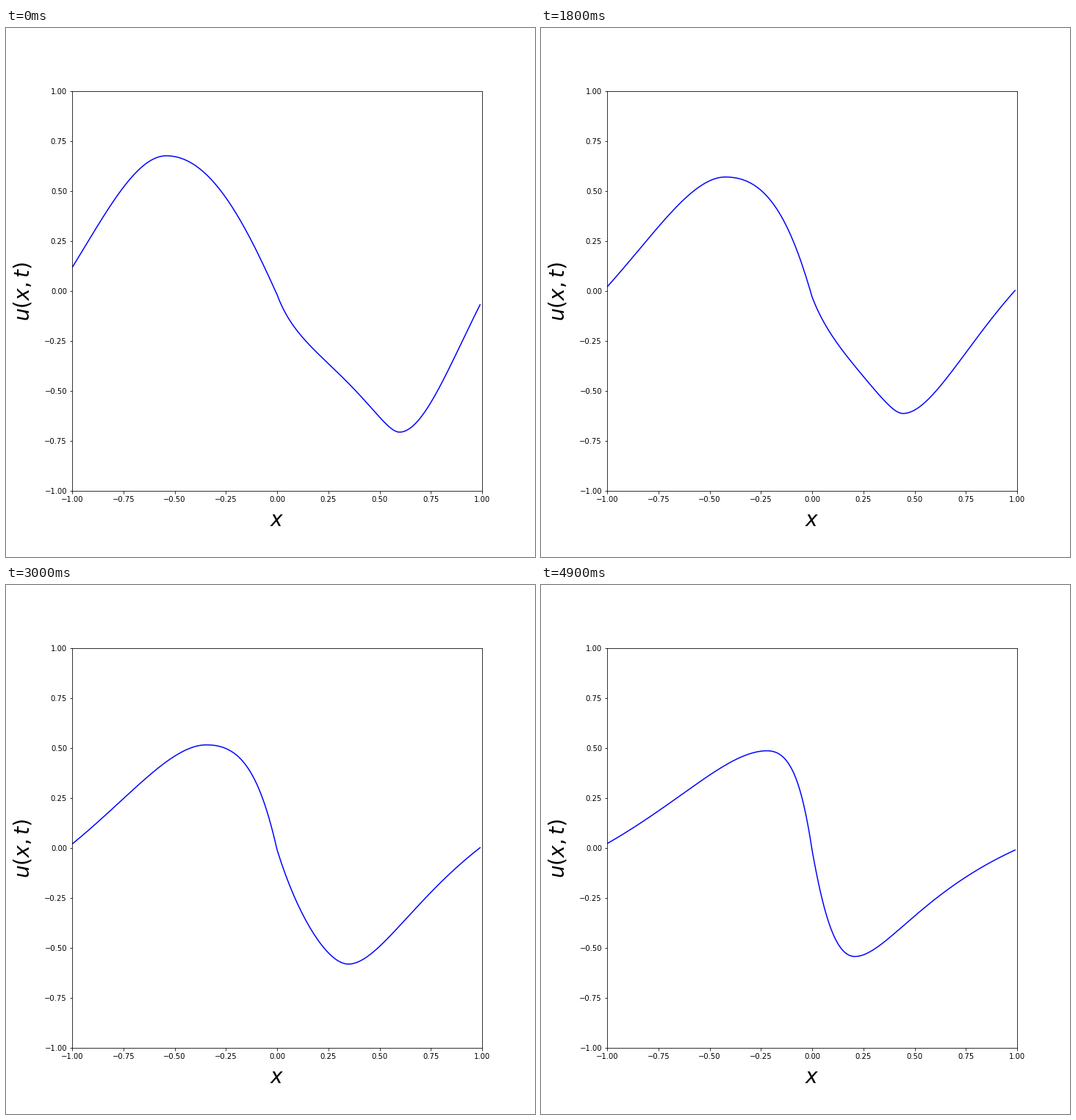
A matplotlib script that plays this animation: 720x720 px, repeating every 5000 ms.

```python
import numpy as np
import matplotlib.pyplot as plt
from matplotlib.animation import FuncAnimation

SIZE, DPI = 720, 72
FRAMES, INTERVAL = 50, 100

x = np.arange(200) * 0.01 - 1


def fade(t, tau, power):
    return np.exp(-(t / tau) ** power)


def arc(foot, peak, skew, shoulder=0):
    """Skewed quarter sine that leaves foot steeply and lands flat on peak."""
    q = np.clip((x - foot[0]) / (peak[0] - foot[0]), 0, 1)
    k = skew + shoulder * q
    return foot[1] + (peak[1] - foot[1]) * np.sin(np.pi / 2 * q / (q + k * (1 - q)))


def wave(t):
    """Steepening wave at t seconds, built from four arcs."""
    relax = fade(t, 0.65, 1.3)
    left = -1, 0.017 + 0.101 * relax + 0.0012 * t
    crest = -0.541 + 0.0655 * t, 0.483 + 0.195 * fade(t, 2.1, 1.55)
    centre = 0, -0.0165 - 0.016 * np.cos(2 * np.pi * (t - 1.25) / 5.3)
    trough = (0.597 - 0.089 * t + 0.002 * t**2,
              -0.638 + 0.0195 * t - 0.068 * fade(t, 1.15, 1.5))
    right = 0.99, 0.006 - 0.074 * relax - 0.00013 * t**3

    rise = arc(left, crest, 1.15 + 0.09 * t)
    fall = arc(centre, crest, 0.51 + 0.0235 * (t - 4)**2)
    dive = arc(centre, trough, 0.66 + 0.13 * np.sin(np.pi * t / 5.4),
               shoulder=1.85 * fade(t, 2.4, 2.5))
    climb = arc(right, trough, 1.25 + 0.13 * t + 0.016 * t**2)
    return np.select([x < crest[0], x < centre[0], x < trough[0]],
                     [rise, fall, dive], climb)


fig = plt.figure(figsize=(SIZE / DPI, SIZE / DPI), dpi=DPI, facecolor="white")
ax = fig.add_axes([0.125, 0.125, 0.775, 0.755])
ticks = np.linspace(-1, 1, 9)
ax.set(xlim=(-1, 1), ylim=(-1, 1), xticks=ticks, yticks=ticks)


def label(px, py, text, rotation=0):
    fig.text(px / SIZE, 1 - py / SIZE, text, fontsize=28, rotation=rotation,
             ha="center", va="baseline", rotation_mode="anchor")


label(369, 677.6, "$x$")
label(31.5, 358.2, "$u(x,t)$", 90)
line, = ax.plot(x, wave(0), color="blue", lw=1.5)


def update(frame):
    line.set_ydata(wave(frame * INTERVAL / 1000))
    return line,


anim = FuncAnimation(fig, update, frames=FRAMES, interval=INTERVAL,
                     repeat=True, repeat_delay=0)
plt.show()
```
